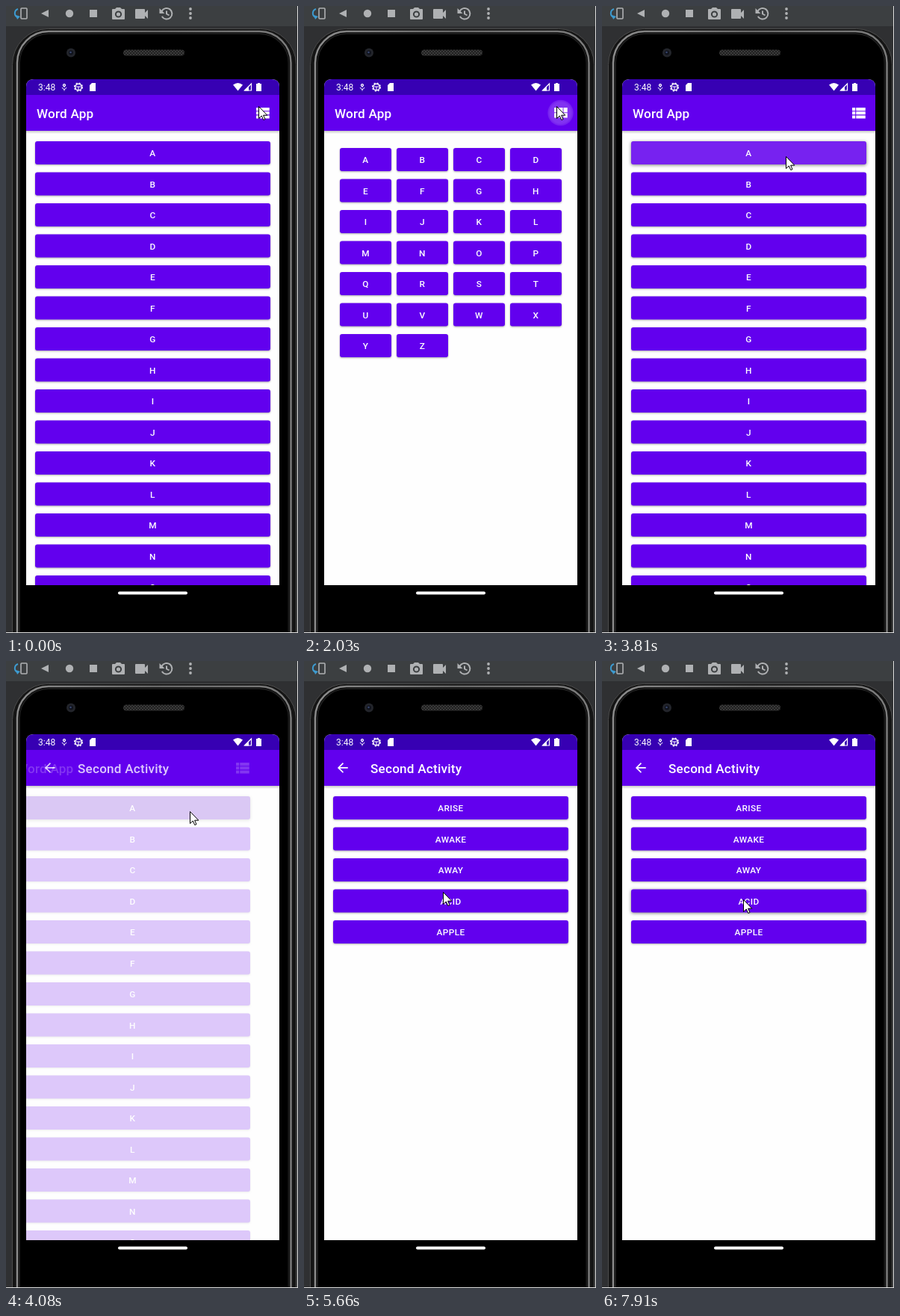
Animation of 391x839 px, one loop 8 s. Source, as an HTML page:

```html
<!DOCTYPE html>
<html lang="en">
<head>
<meta charset="utf-8">
<title>Word App</title>
<style>
html, body { margin: 0; height: 100%; overflow: hidden; background: #2f3032; }
svg { display: block; width: 100vw; height: 100vh; font-family: Roboto, sans-serif; }
.title { font-size: 17.14px; font-weight: 500; letter-spacing: .0125em; fill: #fff; }
.label { font-size: 11.8px; font-weight: 500; letter-spacing: .4px; fill: #fff; text-anchor: middle; }
.button { fill: #6200ee; filter: drop-shadow(0 1.3px 1px rgba(0, 0, 0, .32)); }
.raised { filter: drop-shadow(0 1.5px 2px rgba(0, 0, 0, .5)); }
</style>
</head>
<body>
<svg viewBox="0 0 391 839" preserveAspectRatio="none">
  <defs>
    <linearGradient id="fade" x2="0" y2="1">
      <stop stop-opacity=".22"/><stop offset="1" stop-opacity="0"/>
    </linearGradient>
    <linearGradient id="edge">
      <stop stop-color="#8c8c8c"/><stop offset=".5" stop-color="#6a6a6a"/><stop offset="1" stop-color="#7c7c7c"/>
    </linearGradient>
    <radialGradient id="glow">
      <stop offset=".8" stop-color="#fff"/><stop offset="1" stop-color="#fff" stop-opacity=".5"/>
    </radialGradient>
    <pattern id="mesh" width="4" height="4" patternUnits="userSpaceOnUse">
      <rect width="4" height="4" fill="#3b3b3b"/>
      <circle cx="1" cy="1" r="1" fill="#161616"/><circle cx="3" cy="3" r="1" fill="#161616"/>
    </pattern>
    <clipPath id="screen"><path d="M27 775V108Q27 98 37 98H356Q366 98 366 108V775Z"/></clipPath>
    <clipPath id="firstButton"><rect x="39" y="181" width="315" height="31" rx="3"/></clipPath>
  </defs>

  <!-- emulator toolbar -->
  <rect width="391" height="27" fill="#3c3f41"/>
  <g fill="#afb1b3">
    <path d="M16 4a6 6 0 0 0-1 11" fill="none" stroke="#3d9bd0" stroke-width="2"/>
    <path d="M13 12l6 2-4 4z" fill="#3d9bd0"/>
    <rect x="20" y="3" width="8" height="14" rx="1" fill="none" stroke="#afb1b3" stroke-width="1.6"/>
    <path d="M47 10L57 5V15Z"/>
    <circle cx="85" cy="10" r="5.2"/>
    <rect x="112" y="5" width="10" height="10"/>
    <path d="M143 4h3l2-2h5l2 2h3q1 0 1 1v12q0 1-1 1h-15q-1 0-1-1V5q0-1 1-1z"/>
    <circle cx="150.500" cy="11" r="3.600" fill="#afb1b3" stroke="#3c3f41" stroke-width="2"/>
    <path d="M174 4h11q1 0 1 1v4l4-4v12l-4-4v3q0 1-1 1h-11q-1 0-1-1V5q0-1 1-1z"/>
    <path d="M208.500 7a7.300 7.300 0 1 1 .3 7M215 6.500v4l3.500 2" fill="none" stroke="#afb1b3" stroke-width="2"/>
    <path d="M205.500 3v7h7z"/>
    <circle cx="247" cy="4" r="1.900"/><circle cx="247" cy="10" r="1.900"/><circle cx="247" cy="16" r="1.900"/>
  </g>

  <!-- phone body -->
  <rect x="8.500" y="30.500" width="380" height="900" rx="48" fill="#151515" stroke="#4c4c4c"/>
  <rect x="15" y="34" width="366.500" height="900" rx="42" fill="#000" stroke="url(#edge)" stroke-width="2.500"/>
  <rect x="18" y="37" width="360.500" height="900" rx="39" fill="#000" stroke="#1c1c1c" stroke-width="2"/>
  <circle cx="87" cy="62.500" r="6" fill="#23252b"/>
  <circle cx="87" cy="62.500" r="3" fill="#10131d"/>
  <circle cx="86.500" cy="62" r="1.300" fill="#38456c"/>
  <rect x="157" y="58.500" width="82" height="8" rx="4" fill="url(#mesh)"/>
  <rect x="150" y="783.500" width="93" height="4" rx="2" fill="#fff"/>

  <g clip-path="url(#screen)">
    <rect x="27" y="98" width="339" height="677" fill="#fefefe"/>
    <rect x="27" y="119" width="339" height="48" fill="#6200ee"/>
    <g id="home">
      <text class="title" x="41" y="150">Word App</text>
      <circle id="tap" cx="343.500" cy="143" r="17.300" fill="url(#glow)"/>
      <g transform="translate(330.900 130.800) scale(1.040)" fill="#fff">
        <path id="listIcon" d="M4 14h4v-4H4zm0 5h4v-4H4zM4 9h4V5H4zm5 5h12v-4H9zm0 5h12v-4H9zM9 5v4h12V5z"/>
        <path id="gridIcon" d="M4 11h5V5H4zm0 7h5v-6H4zm6 0h5v-6h-5zm6 0h5v-6h-5zm-6-7h5V5h-5zm6-6v6h5V5z"/>
      </g>
      <g id="list"></g>
      <g id="grid"></g>
      <rect id="scrollbar" x="363" y="167" width="3" height="340" fill="#000" opacity=".35"/>
    </g>
    <g id="second">
      <rect x="27" y="167" width="339" height="608" fill="#fefefe"/>
      <rect x="27" y="119" width="339" height="48" fill="#6200ee"/>
      <g id="heading">
        <path transform="translate(41.500 132.600) scale(.863)" fill="#fff"
          d="M20 11H7.830l5.590-5.590L12 4l-8 8 8 8 1.410-1.410L7.830 13H20z"/>
        <text class="title" x="89" y="150">Second Activity</text>
      </g>
      <g id="words"></g>
    </g>
    <rect x="27" y="167" width="339" height="4" fill="url(#fade)"/>

    <!-- status bar -->
    <rect x="27" y="98" width="339" height="21" fill="#3700b3"/>
    <text x="43" y="113" font-size="12" fill="#fff">3:48</text>
    <g fill="none" stroke="#fff">
      <path d="M78 104v5M75 109q3 5 6 0M78 111v2.500"/>
      <circle cx="78" cy="106" r="1.700"/>
      <circle cx="97" cy="108.500" r="4.300" stroke-width="1.500"/>
      <circle cx="97" cy="108.500" r="5.400" stroke-width="1.400" stroke-dasharray="2.120"/>
      <path d="M94 108h6M97 108v4"/>
      <path d="M319.500 113H328.500V104Z" stroke-width="1.200"/>
    </g>
    <g fill="#fff">
      <path d="M115 103h5v11h-8v-8z"/>
      <path d="M304 105.500q6.500-5 13 0l-6.500 8z"/>
      <path d="M319 113.500L325 107.500V113.500Z"/>
      <path d="M335 104h2v-1h3v1h2v10h-7z"/>
    </g>
  </g>

  <path id="cursor" d="M.5.5V16.500L4.300 13L6.800 18.500L9 17.500L6.600 12.200H11.800Z" fill="#fff" stroke="#000"/>
  <path d="M390.500 0V839M0 838.500H391" stroke="#ddd" fill="none"/>
</svg>
<script>
const LOOP = 8000, ROW = 41.5;
const $ = id => document.getElementById(id);

const button = (text, x, y, width) =>
  `<rect class="button" x="${x}" y="${y}" width="${width}" height="31" rx="3"/>` +
  `<text class="label" x="${x + width / 2}" y="${y + 20.4}">${text}</text>`;
const column = words => words.map((word, i) => button(word, 39, 181 + i * ROW, 315)).join('');

const letters = [...'ABCDEFGHIJKLMNOPQRSTUVWXYZ'];
$('list').innerHTML = column(letters.slice(0, 15));
$('grid').innerHTML = letters.map((letter, i) =>
  button(letter, 48 + i % 4 * 76, 190 + Math.floor(i / 4) * ROW, 69)).join('');
$('words').innerHTML = column(['ARISE', 'AWAKE', 'AWAY', 'ACID', 'APPLE']);

const firstButton = $('list').querySelector('rect');
const acid = $('words').querySelectorAll('rect')[3];
firstButton.insertAdjacentHTML('afterend',
  '<circle id="press" cx="248" cy="202" clip-path="url(#firstButton)"/>');

// Each track holds rows of [start time, ...values]; a row lasts until the next.
const tracks = {
  cursor: [[0, 338, 134], [2680, 257, 197], [2820, 246, 201], [4470, 241, 206], [4590, 222, 243],
    [4710, 197, 292], [4830, 186, 309], [6410, 198, 261], [7050, 198, 273], [7170, 195, 294],
    [7290, 191, 313], [7410, 189, 319]],
  tap: [[0, 0], [370, .2], [490, .22], [640, .1], [760, 0], [2030, .2], [2150, .22],
    [2420, .14], [2540, .06], [2680, 0]],
  press: [[0, 0, 'none'], [3570, 70, '#fff3'], [3690, 220, '#fff3'], [3810, 330, '#fff2'],
    [4080, 330, '#0002']],
  // offset of the leaving screen, offset and opacity of the arriving one
  slide: [[0, 0, 34, 0], [4080, -27, 7, .79], [4200, -32.500, 1.500, 1], [4320, -33.500, .5, 1],
    [4470, -34, 0, 1]]
};
const at = (name, t) => tracks[name].findLast(row => row[0] <= t).slice(1);
const show = (id, on) => $(id).setAttribute('visibility', on ? 'visible' : 'hidden');
const move = (id, x, y = 0) => $(id).setAttribute('transform', `translate(${x} ${y})`);

function draw(t) {
  const isGrid = t >= 490 && t < 2150;
  for (const id of ['grid', 'gridIcon']) show(id, isGrid);
  for (const id of ['list', 'listIcon']) show(id, !isGrid);
  show('scrollbar', t >= 2150 && t < 3570);
  show('words', t >= 5660);

  $('tap').setAttribute('opacity', at('tap', t)[0]);
  const [radius, tint] = at('press', t);
  $('press').setAttribute('r', radius);
  $('press').setAttribute('fill', tint);
  firstButton.classList.toggle('raised', t >= 3570);
  acid.classList.toggle('raised', t >= 7910);

  const [leave, arrive, opacity] = at('slide', t);
  move('home', leave);
  move('heading', arrive);
  $('second').setAttribute('opacity', opacity);
  move('cursor', ...at('cursor', t));
}

const start = performance.now();
function tick() {
  draw((performance.now() - start) % LOOP);
  requestAnimationFrame(tick);
}
tick();
</script>
</body>
</html>
```
